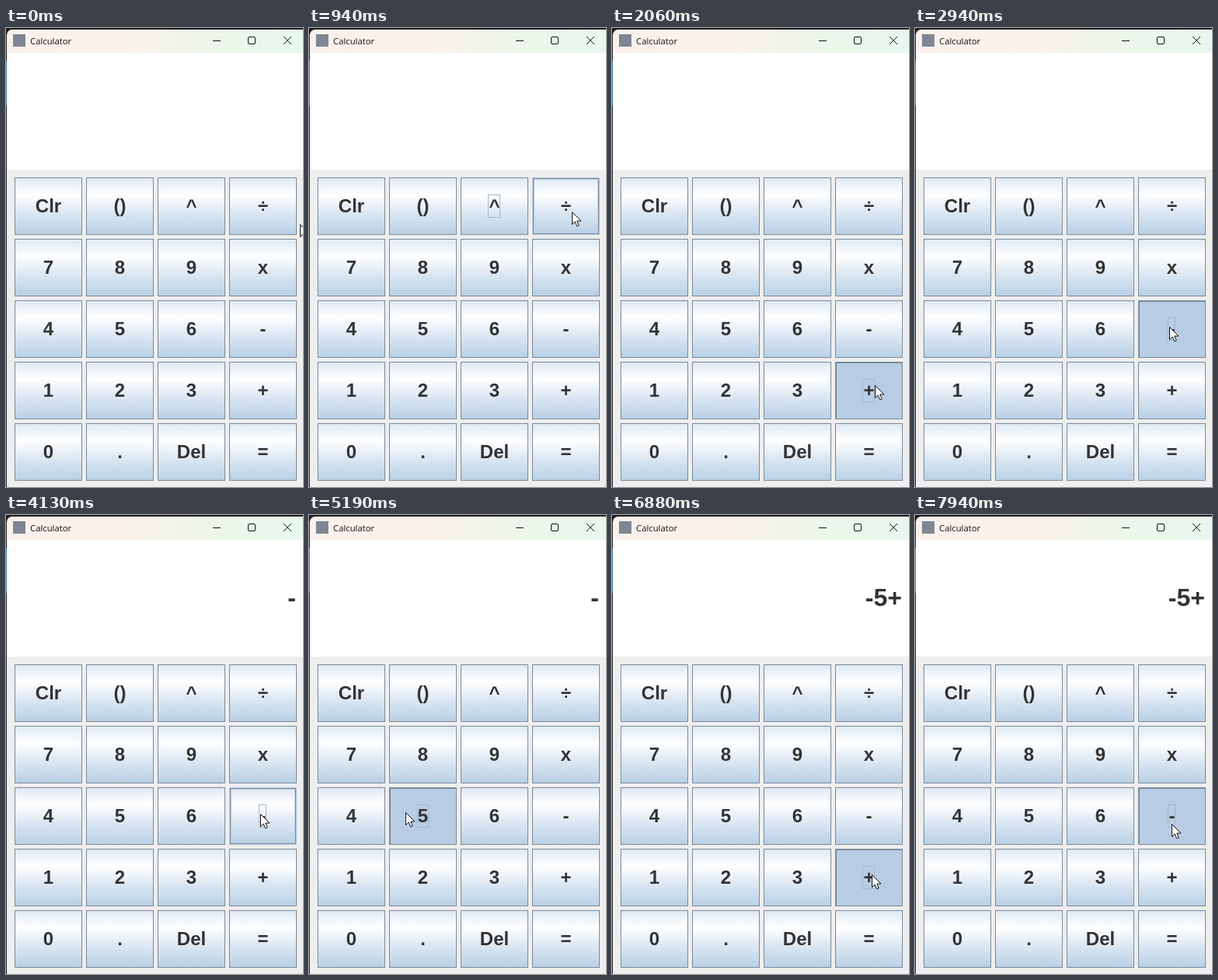
An HTML page that plays this animation: 382x590 px, repeating every 8000 ms.

```html
<!DOCTYPE html>
<html lang="en">
<head>
<meta charset="utf-8">
<title>Calculator</title>
<style>
  html, body { margin: 0; width: 100%; height: 100%; overflow: hidden; background: #202020; }
  svg { display: block; width: 382px; height: 590px; }
  .title { font: 11.3px "Open Sans", "Noto Sans", sans-serif; fill: #111; }
  .key text, #display { font: bold 24px "Liberation Sans", Arial, sans-serif; fill: #333; }
  .key text { text-anchor: middle; }
  #display { font-size: 32px; text-anchor: end; }
  .icons { fill: none; stroke: #111; }
  .key rect { fill: none; }
  .key .face { fill: url(#ocean); }
  .key .edge { stroke: #7a8a99; }
  .key .ring { stroke: #a3b8cc; visibility: hidden; }
  .key .glow, .key .sunk { visibility: hidden; }
  .key .glow rect { stroke: #b8cfe5; }
  .key .glow .mid { stroke: #7a8a99; }
  .key .sunk { fill: none; stroke: #7a8a99; }
  .hover .glow, .focus .ring, .down .sunk { visibility: visible; }
  .down .face { fill: #b8cde4; }
  .down .glow { visibility: hidden; }
</style>
</head>
<body>
<svg viewBox="0 0 382 590">
  <defs>
    <linearGradient id="ocean" x2="0" y2="1">
      <stop offset="0" stop-color="#dde8f3"/>
      <stop offset=".3" stop-color="#fff"/>
      <stop offset=".6" stop-color="#dde8f3"/>
      <stop offset="1" stop-color="#b8cfe5"/>
    </linearGradient>
    <linearGradient id="bar">
      <stop offset="0" stop-color="#fcf0ec"/>
      <stop offset=".45" stop-color="#f8f3ea"/>
      <stop offset=".75" stop-color="#ebf7eb"/>
      <stop offset="1" stop-color="#e8f7ee"/>
    </linearGradient>
  </defs>
  <rect width="382" height="590" fill="#202020"/>
  <rect y="42" width="1" height="58" fill="#3a78b8"/>
  <path d="M1 32V9a7 7 0 0 1 7-7H382V32Z" fill="url(#bar)"/>
  <rect x="1" y="32" width="381" height="150" fill="#fff"/>
  <rect x="1" y="182" width="381" height="408" fill="#eee"/>
  <rect x="9" y="8" width="16" height="16" fill="#7d8794"/>
  <text class="title" x="31" y="21">Calculator</text>
  <g class="icons">
    <path d="M266 16.5H276M357 11L367 21M367 11L357 21"/>
    <rect x="311.5" y="11.5" width="9" height="9" rx="1.5"/>
  </g>
  <text id="display" x="373" y="117"></text>
  <g id="keys"></g>
  <path id="cursor" d="M.5 .5V16.5L4.2 13L6.7 18.8L9.2 17.7L6.8 12H12Z" fill="#fff" stroke="#111"/>
</svg>
<script>
  const TICK = 62.5, TICKS = 128;
  const LABELS = ["Clr", "()", "^", "÷", "7", "8", "9", "x", "4", "5", "6", "-",
                  "1", "2", "3", "+", "0", ".", "Del", "="];
  const KEY_W = 87, KEY_H = 74;

  // Pointer stops: tick, x, y
  const PATH = [
    [0, 378, 252], [1, 372, 251], [6, 246, 238], [12, 246, 238],
    [15, 338, 236], [20, 338, 236], [23, 338, 316], [27, 338, 316],
    [31, 338, 459], [39, 338, 459], [45, 327, 384], [70, 327, 384],
    [74, 124, 382], [95, 124, 382], [101, 334, 462], [114, 334, 462],
    [122, 330, 397], [128, 330, 397]
  ];
  // Presses: label, tick down, tick up
  const PRESSES = [
    ["^", 8, 11], ["÷", 17, 20], ["x", 24, 27], ["+", 33, 36],
    ["-", 47, 53], ["5", 83, 85], ["+", 103, 115], ["-", 125, 128]
  ];
  const READOUT = [[0, ""], [52, "-"], [84, "-5"], [110, "-5+"]];

  const display = document.getElementById("display");
  const cursor = document.getElementById("cursor");

  const outline = (cls, x, y, w, h) =>
    `<rect class="${cls}" x="${x + .5}" y="${y + .5}" width="${w - 1}" height="${h - 1}"/>`;

  const inset = (cls, x, y, d) => outline(cls, x + d, y + d, KEY_W - 2 * d, KEY_H - 2 * d);

  function keyMarkup(label, i) {
    const x = 11 + i % 4 * 92, y = 192 + Math.floor(i / 4) * 79;
    const ringW = { "-": 10, "5": 15 }[label] || 16;
    const ringX = x + Math.floor((KEY_W - ringW) / 2);
    return `<g class="key">
      <rect class="face" x="${x}" y="${y}" width="${KEY_W}" height="${KEY_H}"/>
      ${inset("edge", x, y, 0)}
      <g class="glow">${inset("", x, y, 0)}${inset("mid", x, y, 1)}${inset("", x, y, 2)}</g>
      <path class="sunk" d="M${x + 1.5} ${y + KEY_H}V${y + 1.5}H${x + KEY_W}"/>
      <text x="${x + KEY_W / 2}" y="${y + 45}">${label}</text>
      ${outline("ring", ringX, y + 22, ringW, 30)}
    </g>`;
  }

  const board = document.getElementById("keys");
  board.innerHTML = LABELS.map(keyMarkup).join("");
  const keys = [...board.children];

  function pointerAt(tick) {
    const i = PATH.findIndex(p => p[0] > tick);
    const [t0, x0, y0] = PATH[i - 1], [t1, x1, y1] = PATH[i];
    const u = (tick - t0) / (t1 - t0), e = u * u * (3 - 2 * u);
    return [Math.round(x0 + (x1 - x0) * e), Math.round(y0 + (y1 - y0) * e)];
  }

  function keyUnder(x, y) {
    const col = Math.floor((x - 11) / 92), row = Math.floor((y - 192) / 79);
    const inside = col >= 0 && col < 4 && row >= 0 && row < 5 &&
      x - 11 - col * 92 < KEY_W && y - 192 - row * 79 < KEY_H;
    return inside ? row * 4 + col : -1;
  }

  function draw(tick) {
    const [x, y] = pointerAt(tick);
    const over = keyUnder(x, y);
    const press = PRESSES.filter(p => p[1] <= tick).pop();
    const focused = press ? LABELS.indexOf(press[0]) : -1;
    const held = press && tick < press[2];
    cursor.setAttribute("transform", `translate(${x} ${y})`);
    display.textContent = READOUT.filter(r => r[0] <= tick).pop()[1];
    keys.forEach((key, i) => {
      key.classList.toggle("hover", i === over);
      key.classList.toggle("focus", i === focused);
      key.classList.toggle("down", i === focused && !!held);
    });
  }

  // The picture advances in whole ticks, with a few ms of slack for rounding.
  const start = performance.now();
  let last = -1;
  function loop() {
    const tick = Math.floor((performance.now() - start + 5) / TICK) % TICKS;
    if (tick !== last) draw(last = tick);
    requestAnimationFrame(loop);
  }
  loop();
</script>
</body>
</html>
```
